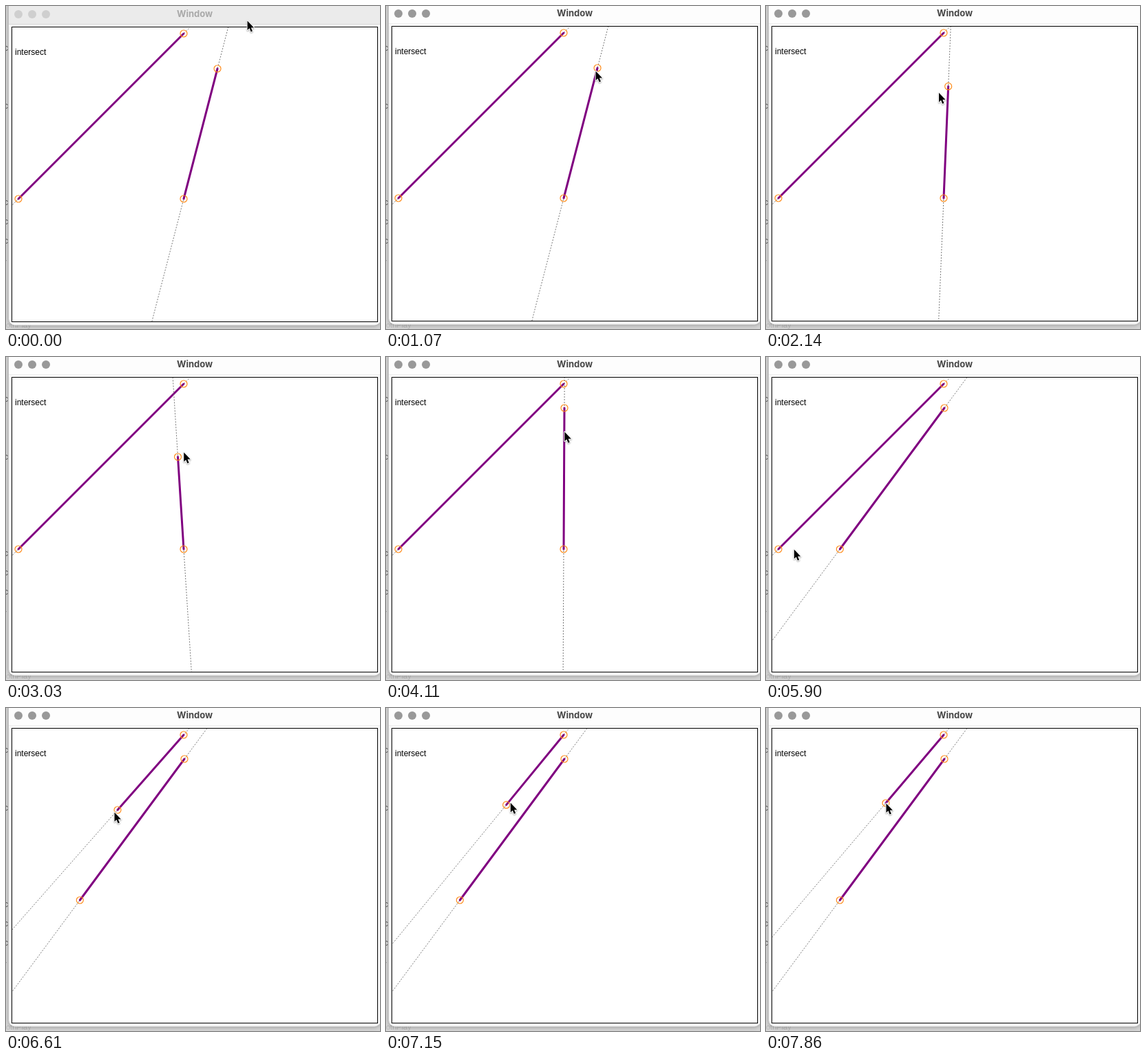
Animation of 543x469 px, one loop 8 s. Source, as an HTML page with a canvas:

```html
<!DOCTYPE html>
<html lang="en">
<head>
<meta charset="utf-8">
<title>Window</title>
<style>
  html, body { margin: 0; width: 100%; height: 100%; overflow: hidden; background: #d6d6d6; }
  canvas { display: block; }
</style>
</head>
<body>
<canvas id="stage" width="543" height="469"></canvas>
<script>
const ctx = document.getElementById('stage').getContext('2d');
const LOOP = 8000, TICK = 178.6;
const CURSOR_LEAD = 0.5; // ticks by which the pointer runs ahead of a dragged handle
const FRAME = [8.5, 29.5, 531, 428];
const FIXED_END = [258, 39];

// One pointer path moves everything; a handle follows it only during its drag.
const path = [
  { tick: 4, to: [350, 21] },
  { tick: 6.5, to: [304, 94] },
  { tick: 8, to: [307, 90] },
  { tick: 10.5, to: [307, 90] },
  { tick: 15, to: [180, 170] },
  { tick: 17, to: [249.5, 145] },
  { tick: 18, to: [266, 131] },
  { tick: 20, to: [247, 132] },
  { tick: 23, to: [259, 74] },
  { tick: 26, to: [258, 279] },
  { tick: 29, to: [193.5, 294] },
  { tick: 30, to: [160, 302] },
  { tick: 32, to: [107.3, 279] },
  { tick: 34, to: [18, 279] },
  { tick: 36, to: [172, 142] },
  { tick: 38, to: [152, 154] },
  { tick: 41, to: [186, 134] },
  { tick: 44, to: [174, 138] }
];
const drags = { upper: [10.5, 23], lower: [26, 32], left: [34, 44] };

const clamp = (v, lo, hi) => Math.min(Math.max(v, lo), hi);

function pointOnPath(tick) {
  const t = clamp(tick, path[0].tick, path[path.length - 1].tick);
  const i = Math.max(1, path.findIndex(key => key.tick >= t));
  const a = path[i - 1], b = path[i];
  const k = (t - a.tick) / (b.tick - a.tick);
  return a.to.map((v, axis) => v + (b.to[axis] - v) * k);
}

const handle = (name, tick) => pointOnPath(clamp(tick, ...drags[name]));

function line(a, b, color, width, dash = []) {
  ctx.beginPath();
  ctx.moveTo(...a);
  ctx.lineTo(...b);
  ctx.setLineDash(dash);
  ctx.strokeStyle = color;
  ctx.lineWidth = width;
  ctx.stroke();
  ctx.setLineDash([]);
}

function circlePath(x, y, r) {
  ctx.beginPath();
  ctx.arc(x, y, r, 0, Math.PI * 2);
}

function text(value, x, y, font, color, align = 'left') {
  ctx.font = font;
  ctx.fillStyle = color;
  ctx.textAlign = align;
  ctx.fillText(value, x, y);
}

function drawBackdrop() {
  ctx.fillStyle = '#d6d6d6';
  ctx.fillRect(0, 0, 543, 469);
  [...'c :c    ccc-'].forEach((glyph, row) =>
    text(glyph, -3, 65 + row * 28, '12px "Liberation Sans", sans-serif', '#555'));
  text('othPlay', 0, 467, '11px "Liberation Sans", sans-serif', '#b8b8b8');
}

function drawWindow(active) {
  ctx.save();
  ctx.beginPath();
  ctx.roundRect(4, -12, 540, 474.5, 9);
  ctx.shadowColor = 'rgba(0,0,0,.3)';
  ctx.shadowBlur = 6;
  ctx.shadowOffsetY = 1;
  ctx.fillStyle = '#f8f8f8';
  ctx.fill();
  ctx.restore();
  ctx.fillStyle = active ? '#fdfdfd' : '#ebebeb';
  ctx.fillRect(4, -2, 539, 27);
  ctx.fillStyle = active ? '#eeeeee' : '#dadada';
  ctx.fillRect(4, 25, 539, 1);
  for (const x of [18, 38, 58]) {
    circlePath(x, 11, 6);
    ctx.fillStyle = active ? '#999' : '#cfcfcf';
    ctx.fill();
  }
  text('Window', 274, 15, '700 13px Inter, sans-serif', active ? '#474747' : '#a9a9a9', 'center');
}

function drawSegment(a, b) {
  const dx = b[0] - a[0], dy = b[1] - a[1];
  const far = 1000 / Math.hypot(dx, dy);
  line([a[0] - dx * far, a[1] - dy * far], [b[0] + dx * far, b[1] + dy * far], '#777', 1, [2, 2]);
  ctx.lineCap = 'round';
  line(a, b, '#800080', 3);
  ctx.lineCap = 'butt';
  for (const end of [a, b]) {
    circlePath(...end, 5);
    ctx.strokeStyle = '#ff8c1a';
    ctx.lineWidth = 1.2;
    ctx.stroke();
  }
}

function drawContent(tick) {
  ctx.fillStyle = '#fff';
  ctx.fillRect(...FRAME);
  ctx.save();
  ctx.beginPath();
  ctx.rect(...FRAME);
  ctx.clip();
  drawSegment(handle('left', tick), FIXED_END);
  drawSegment(handle('lower', tick), handle('upper', tick));
  ctx.restore();
  ctx.strokeStyle = '#000';
  ctx.lineWidth = 1;
  ctx.strokeRect(...FRAME);
  text('intersect', 13, 70, '12px "Liberation Sans", Arial, sans-serif', '#000');
}

function drawCursor([x, y]) {
  ctx.save();
  ctx.translate(x + 0.5, y + 0.5);
  const arrow = new Path2D('M0 0V13.6L3 10.8L5.1 16L7.4 15L5.3 10H9.5Z');
  ctx.lineJoin = 'round';
  ctx.strokeStyle = '#fff';
  ctx.lineWidth = 2;
  ctx.shadowColor = 'rgba(0,0,0,.35)';
  ctx.shadowBlur = 2;
  ctx.shadowOffsetY = 1;
  ctx.stroke(arrow);
  ctx.shadowColor = 'transparent';
  ctx.fillStyle = '#000';
  ctx.fill(arrow);
  ctx.restore();
}

function render(now) {
  // The picture advances in whole ticks.
  const tick = Math.floor((now % LOOP + 6) / TICK);
  drawBackdrop();
  ctx.save();
  ctx.translate(0, tick < 2 ? 1 : 0);
  drawWindow(tick >= 1);
  drawContent(tick);
  ctx.restore();
  drawCursor(pointOnPath(tick + CURSOR_LEAD));
}

const start = performance.now();
function loop() {
  render(performance.now() - start);
  requestAnimationFrame(loop);
}
loop();
</script>
</body>
</html>
```
